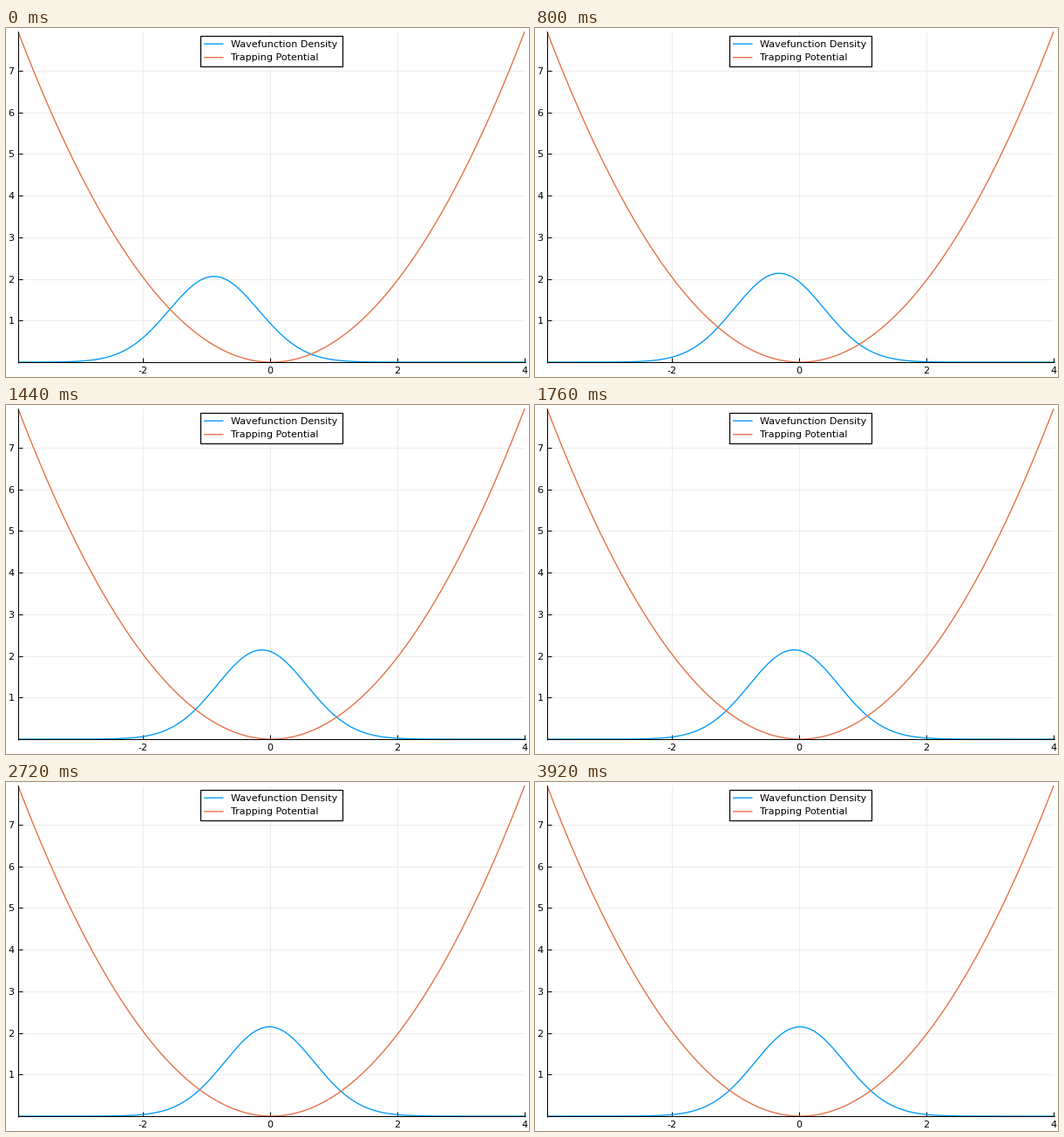
A matplotlib script that plays this animation: 600x400 px, repeating every 3960 ms.

```python
import numpy as np
import matplotlib.pyplot as plt
from matplotlib.animation import FuncAnimation
from matplotlib.patches import Rectangle

W, H, DPI = 600, 400, 100
PX = 72 / DPI                      # one pixel in points
FRAMES, INTERVAL = 99, 40
BLUE, ORANGE = "#009afa", "#e36f47"
LEFT, RIGHT, TOP, BOTTOM = 13.8, 595, 4.1, 383

# The grid is periodic, so its middle lies half a step right of zero.
N = 256
DX = 8 / N
x = np.arange(1 - N // 2, N // 2 + 1) * DX
MID = DX / 2
potential = 0.5 * (x - MID) ** 2
V_MAX = potential.max()

plt.rcParams["font.family"] = "DejaVu Sans"
fig = plt.figure(figsize=(W / DPI, H / DPI), dpi=DPI, facecolor="white")
ax = fig.add_axes([0, 0, 1, 1])
ax.set_xlim(0, W)
ax.set_ylim(H, 0)
ax.axis("off")


def to_px(v):
    return LEFT + (v - x[0]) / (x[-1] - x[0]) * (RIGHT - LEFT)


def to_py(v):
    return BOTTOM - v / V_MAX * (BOTTOM - TOP)


def line(xs, ys, color, width=1.0, z=1, **kw):
    return ax.plot(xs, ys, color=color, lw=width * PX, zorder=z,
                   solid_capstyle="butt", **kw)[0]


def rule(x0, y0, x1, y1, color="black", z=6):
    line([x0, x1], [y0, y1], color, z=z, snap=True)


def label(px, baseline, text, ha):
    ax.text(px, baseline, text, fontsize=8, ha=ha, va="baseline", zorder=9)


def density(step):
    """Gaussian packet relaxing towards the trap centre."""
    c = -0.904 * np.exp(-0.05 * step)
    return 2.145 * np.exp(-0.05 * c ** 2 - 1.01 * (x - MID - c) ** 2)


# Grid, ticks and tick labels
GRID = "#ececec"
for v in (-2, 0, 2, 4):
    p = to_px(v)
    if v < 4:
        rule(p, TOP, p, BOTTOM, GRID, 1)
    rule(p, BOTTOM, p, BOTTOM - 5, z=3)
    label(p - 0.5, 396, str(v), "center")
for v in range(1, 8):
    p = to_py(v)
    rule(LEFT, p, RIGHT, p, GRID, 1)
    rule(LEFT, p, LEFT + 5, p, z=3)
    label(9.5, p + 4.1, str(v), "right")

# Axes cover the lower half of curves lying on the baseline
rule(LEFT, TOP, LEFT, BOTTOM + 1)
rule(LEFT, BOTTOM, RIGHT + 1, BOTTOM)

# Curves
CURVE = 1.35
wave = line(to_px(x), to_py(density(0)), BLUE, CURVE, 4)
line(to_px(x), to_py(potential), ORANGE, CURVE, 5)

# Legend
ax.add_patch(Rectangle((223, 9), 163, 35, fc="white", ec="black",
                       lw=1.2 * PX, joinstyle="round", zorder=7))
for y, color, text in ((18.2, BLUE, "Wavefunction Density"),
                       (33.8, ORANGE, "Trapping Potential")):
    line([227, 249.5], [y, y], color, CURVE, 8, snap=False)
    label(258, y + 3.6, text, "left")


def update(step):
    wave.set_ydata(to_py(density(step)))
    return (wave,)


anim = FuncAnimation(fig, update, frames=FRAMES, interval=INTERVAL,
                     repeat=True, repeat_delay=0)
plt.show()
```
